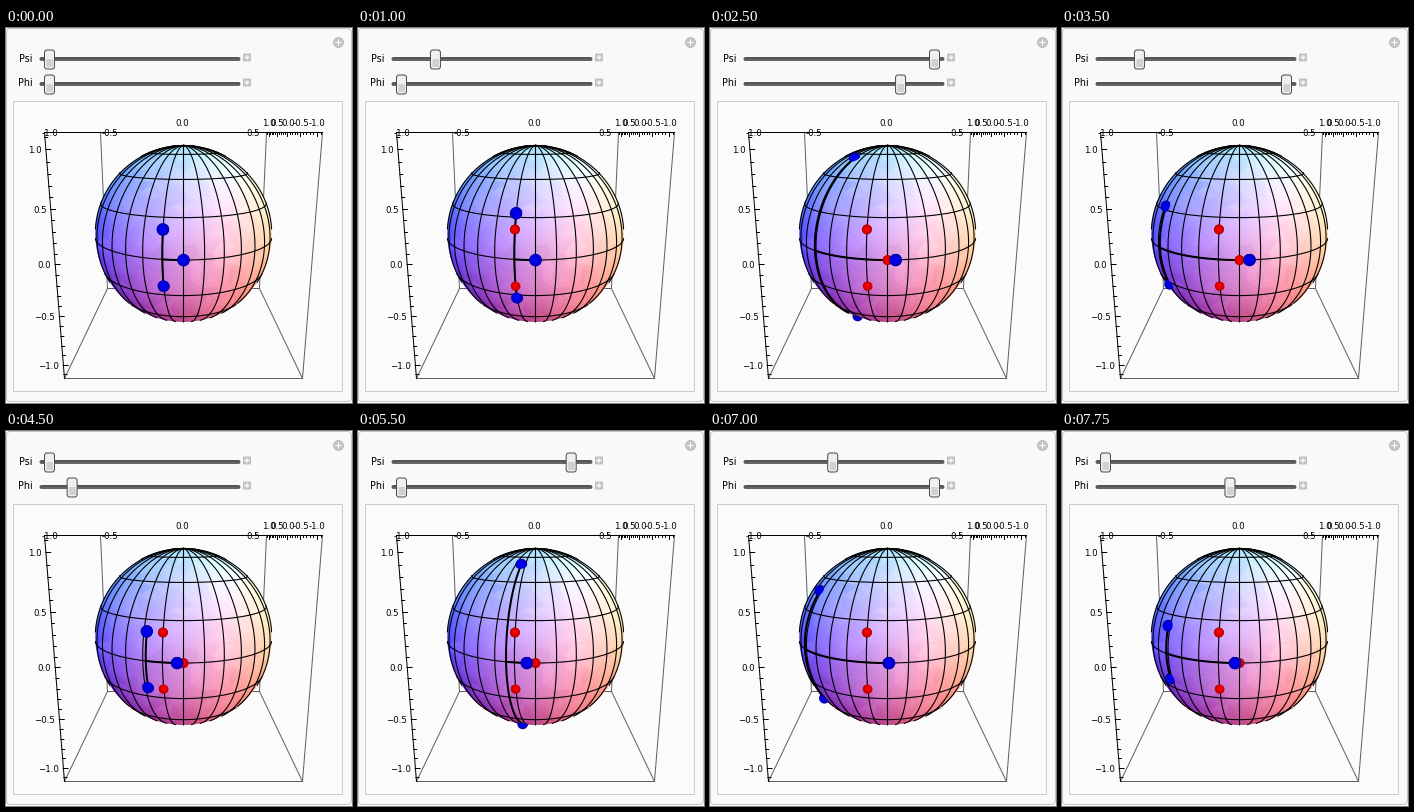
A matplotlib script for the animation above (8 s loop, 346 by 375 pixels).

```python
import numpy as np
import matplotlib.pyplot as plt
from matplotlib.animation import FuncAnimation
from matplotlib.patches import Circle, FancyBboxPatch, Rectangle

plt.rcParams["path.snap"] = False

W, H, DPI = 346, 375, 100
PX = 72 / DPI                      # points per pixel
CX, CY, FOCAL = 177, 205.2, 405    # screen centre and focal length
R = 0.8775                         # sphere radius, box half-width is 1
CAM = np.array([0.0, -4.0, 1.0])
DIST = np.hypot(4, 1)
LAT0, LAT1 = 16, 62                # latitude of the outer points, degrees
SEP0, SEP1 = 11.3, 59.5            # longitude gap between middle and outer points
PUSH, PULL = 0.11, 0.205           # recoil of the middle point, gap opening / closing
STEPS = 16

# position on the closed path psi up, phi up, psi down, phi down
KEY_TIME = [0, 1, 4, 5, 10, 11, 15, 19, 20, 23, 25, 28]
KEY_POS = [0, 3, 15, 22, 41, 47, 65, 83, 87, 100, 111, 124]


def to_camera(p):
    x, y, z = np.asarray(p, float).T - CAM.reshape(3, *[1] * (np.ndim(p) - 1))
    return x, (y + 4 * z) / DIST, (4 * y - z) / DIST


def project(p):
    x, y, depth = to_camera(p)
    return CX + FOCAL * x / depth, CY - FOCAL * y / depth


def on_sphere(lon, lat):
    lon, lat = np.broadcast_arrays(np.radians(lon), np.radians(lat))
    return R * np.stack([np.cos(lat) * np.sin(lon),
                         -np.cos(lat) * np.cos(lon), np.sin(lat)], -1)


def visible_curve(lon, lat):
    p = on_sphere(lon, lat)
    x, y = project(p)
    hidden = p @ CAM < R * R
    return np.where(hidden, np.nan, x), np.where(hidden, np.nan, y)


def path_state(n):
    """Return psi, phi (0..1) and the longitude of the middle point."""
    k = int(round(np.interp(n, KEY_TIME, KEY_POS)))
    cycle, k = divmod(k, 4 * (STEPS + 1))
    leg, v = divmod(k, STEPS + 1)
    v /= STEPS
    psi, phi = [(v, 0), (1, v), (1 - v, 1), (0, 1 - v)][leg]
    span = SEP1 - SEP0
    lon = cycle * span * (PUSH - PULL)
    lon += span * (PUSH * phi if leg < 3 else PUSH - PULL * (1 - phi))
    return psi, phi, lon


# ---------- ray-traced sphere ----------
YY, XX = np.mgrid[0:H, 0:W].astype(float)
DX, DY = (XX - CX) / FOCAL, (CY - YY) / FOCAL


def trace_sphere():
    a = DX**2 + DY**2 + 1
    disc = DIST**2 - a * (DIST**2 - R**2)
    t = (DIST - np.sqrt(np.maximum(disc, 0))) / a
    n = np.stack([t * DX, t * DY, DIST - t], -1) / R
    rng = np.random.default_rng(4)
    sites = rng.uniform(-1, 1, (300, 2))
    gap = (n[..., :1] - sites[:, 0])**2 + (n[..., 1:2] - sites[:, 1])**2
    facet = rng.normal(0, 4, 300)[gap.argmin(-1)]
    light = np.array([[103, 77, -43], [-8, 90, 86], [75, 50, 60]])
    rgb = np.array([150, 131, 190]) + n @ light + facet[..., None]
    radius = FOCAL * R / np.sqrt(DIST**2 - R**2)
    alpha = np.clip(radius + 0.5 - np.hypot(XX - CX, YY - CY), 0, 1)
    image = np.dstack([np.clip(rgb, 0, 255) / 255, alpha])
    return image, np.where(disc > 0, t, np.inf)


SPHERE, SURFACE = trace_sphere()


def add_ball(layer, lon, lat, size, color):
    p = on_sphere(lon, lat)
    depth = to_camera(p)[2]
    x, y = project(p)
    d = np.hypot(XX - x, YY - y)
    radius = size * FOCAL / depth
    bulge = np.sqrt(np.maximum(1 - (d / radius)**2, 0))
    front = depth - size * bulge
    alpha = np.clip(radius - d + 0.5, 0, 1)
    alpha = (alpha * np.clip((SURFACE - front) / 0.02 + 0.7, 0, 1))[..., None]
    rgb = np.array(color) * (0.55 + 0.45 * bulge[..., None])
    old = layer[..., 3:]
    total = alpha + old * (1 - alpha)
    mix = rgb * alpha + layer[..., :3] * old * (1 - alpha)
    layer[..., :3] = mix / np.maximum(total, 1e-6)
    layer[..., 3:] = total


def add_trio(layer, lon, gap, lat, size, color):
    for args in ((lon - gap, lat), (lon - gap, -lat), (lon, 0)):
        add_ball(layer, *args, size, color)


BASE = np.zeros((H, W, 4))
add_trio(BASE, 0, SEP0, LAT0, 0.041, (0.97, 0, 0))

# ---------- stage ----------
fig = plt.figure(figsize=(W / DPI, H / DPI), dpi=DPI, facecolor="white")
ax = fig.add_axes([0, 0, 1, 1])
ax.set_axis_off()


def line(x, y, color="black", width=1, z=1, **kw):
    return ax.plot(x, y, color=color, lw=width * PX, zorder=z, **kw)[0]


def text(x, y, s, size=8.6, ha="center"):
    ax.text(x, y, s, fontsize=size * PX, family="DejaVu Sans", ha=ha,
            va="center_baseline", color="black", zorder=8)


def rounded(x, y, w, h, r, fc, ec, z):
    box = FancyBboxPatch((x, y), w, h, boxstyle=f"round,pad=0,rounding_size={r}",
                         fc=fc, ec=ec, lw=PX, zorder=z)
    return ax.add_patch(box)


def plus(x, y, r, color):
    line([x - r, x + r], [y, y], color, 1, 3)
    line([x, x], [y - r, y + r], color, 1, 3)


rounded(0, 0, W - 1, H - 2, 4, "#f9f9f9", "#c4c4c4", 0)
ax.add_patch(Rectangle((7, 73), 329, 290, fc="#fbfbfb", ec="#cccccc", lw=PX, zorder=0))
ax.add_patch(Circle((332, 14), 5, fc="#c4c4c4", ec="#b4b4b4", lw=0.5, zorder=2))
plus(332, 14, 2.5, "white")


class Slider:
    def __init__(self, y, label):
        text(26.5, y - 1.5, label, 9.6, "right")
        line([35, 232], [y, y], "#555555", 4, 2, solid_capstyle="round")
        line([35, 232], [y + 1, y + 1], "#777777", 1, 2)
        ax.add_patch(Rectangle((237, y - 5), 7, 7, fc="#c8c8c8", ec="#b0b0b0",
                               lw=0.5, zorder=2))
        plus(240.5, y - 1.5, 2, "white")
        self.knob = rounded(38, y - 9, 10, 19, 2.5, "#efefef", "#4c4c4c", 4)
        self.shade = ax.add_patch(Rectangle((40, y), 6.5, 8, fc="#d0d0d0", zorder=5))

    def set(self, v):
        x = 38 + 181 * v
        self.knob.set_x(x)
        self.shade.set_x(x + 2)


psi_slider, phi_slider = Slider(30.5, "Psi"), Slider(55.5, "Phi")


def edge(a, b, color="#606060"):
    x, y = project(np.array([a, b], float))
    line(np.round(x), np.round(y), color)


# bounding box
edge((-1, 1, -1), (1, 1, -1))
edge((-1, -1, -1), (1, -1, -1))
for s in (-1, 1):
    edge((s, 1, -1), (s, 1, 1))
    edge((s, -1, -1), (s, 1, -1))
edge((1, -1, -1), (1, -1, 1))
edge((-1, -1, -1), (-1, -1, 1), "black")
edge((-1, -1, 1), (1, -1, 1), "black")

# ticks
for i in range(-11, 12):
    major = i % 5 == 0
    x, y = project((-1, -1, R * i / 10))
    line([x, x + (5 if major else 3)], np.round([y, y]))
    if major:
        text(x - 4, y, f"{i / 10:.1f}".replace("-", "\u2212"), ha="right")
    x, y = project((1, R * i / 10, 1))
    line(np.round([x, x]), [y, y + (4 if major else 2)])
    if major:
        text(x, 94.5, f"{i / 10:.1f}")
for x, y, s in ((43, 104.5, "-1.0"), (103, 104.5, "-0.5"),
                (176, 94.5, "0.0"), (247, 104.5, "0.5")):
    text(x, y, s)

# sphere and its mesh
ax.imshow(SPHERE, zorder=2.5, interpolation="nearest", aspect="auto")
for lon in np.arange(-180, 180, 11.25):
    line(*visible_curve(lon, np.linspace(-90, 90, 181)), width=1.1, z=3)
for lat in np.arange(-67.5, 70, 22.5):
    line(*visible_curve(np.linspace(-180, 180, 361), lat), width=1.1, z=3)

meridian = line([], [], width=2, z=4)
equator = line([], [], width=2, z=4)
balls = ax.imshow(BASE, zorder=6, interpolation="nearest", aspect="auto")
ax.set_xlim(-0.5, W - 0.5)
ax.set_ylim(H - 0.5, -0.5)


def draw(i):
    psi, phi, lon = path_state(max(0, i - 3))
    lat = LAT0 + (LAT1 - LAT0) * psi
    gap = SEP0 + (SEP1 - SEP0) * phi
    psi_slider.set(psi)
    phi_slider.set(phi)
    meridian.set_data(*visible_curve(lon - gap, np.linspace(-lat, lat, 120)))
    equator.set_data(*visible_curve(np.linspace(lon - gap, lon, 60), 0))
    layer = BASE.copy()
    add_trio(layer, lon, gap, lat, 0.0515, (0, 0, 0.95))
    balls.set_data(layer)
    return meridian, equator, balls


anim = FuncAnimation(fig, draw, frames=32, interval=250, repeat=True,
                     repeat_delay=0, blit=False)
plt.show()
```
